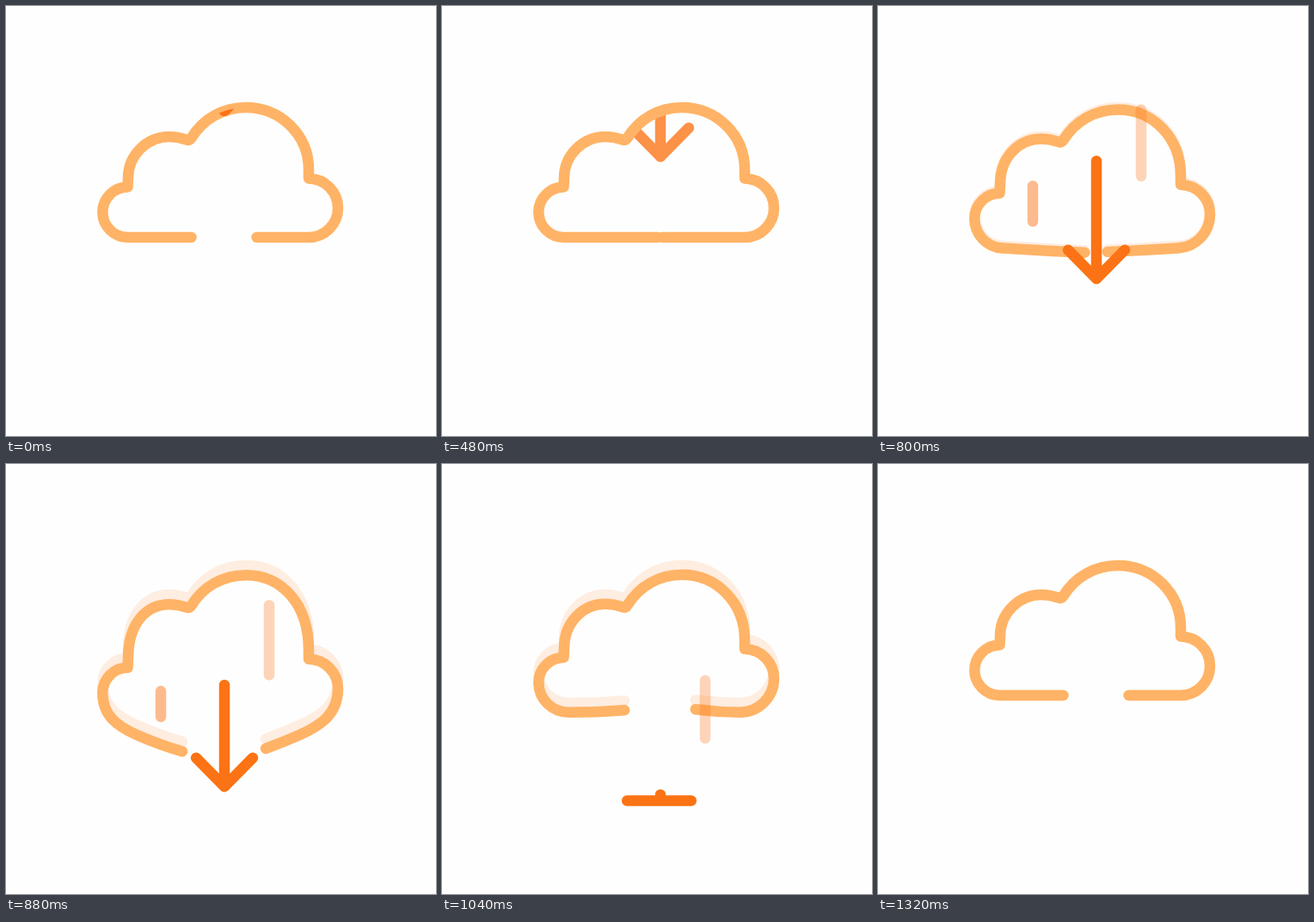
These frames come from a looping animation (500x500 px, 1480 ms). An HTML page with a canvas:

```html
<!DOCTYPE html>
<html lang="en">
<head>
<meta charset="utf-8">
<title>Cloud download</title>
<style>
html, body { margin: 0; width: 100%; height: 100%; overflow: hidden; background: #fefefe; }
canvas { display: block; }
</style>
</head>
<body>
<canvas id="stage" width="500" height="500"></canvas>
<script>
const ctx = document.getElementById('stage').getContext('2d');
const LOOP = 1480, STEP = 40, LAST = 1320;
const CLOUD = '#ffb366', ARROW = '#fb7315';
const FLOOR = 391.5, WING = 33.5, SHAFT = 137;
const HIT = 750, PEAK = 900;  // the arrow pushes through the cloud's base

const ramp = (t, from, to) => Math.max(0, Math.min(1, (t - from) / (to - from)));
const smooth = (t, from, to) => {
  const u = ramp(t, from, to);
  return u * u * (3 - 2 * u);
};
const pulse = (t, from, peak, to) => smooth(t, from, peak) - smooth(t, peak, to);
const mix = (a, b, u) => a + (b - a) * u;

// Height of the falling tip, ignoring the floor
const fall = t => 122 + .036 * t + 3.25e-7 * t ** 3;

function cloudPath(t, shift) {
  const droop = 27.7 * pulse(t, HIT, PEAK, 1190);
  const push = pulse(t, HIT, PEAK, 1108);
  const dip = 68.5 * push;
  const closing = (1 - ramp(t, 0, 560)) ** 1.35;
  const gap = 38 * (closing + smooth(t, HIT, PEAK)) + 13 * push;

  const lx = 253.5 - gap, ly = 269 + dip;
  const rx = 253.5 + gap, ry = 269 + dip * .95;
  const k1 = 141.5 + .4 * droop, k2 = 352 - .4 * droop;
  const ky = 269 + droop + .3 * dip;
  const slope = Math.max(0, 1.2 * (ly - ky) / (lx - k1));
  const p1 = 239.8 + droop, p2 = 235 + droop;
  const h1 = .55 * (k1 - 112.3), h2 = .55 * (386 - k2);
  const m1 = (lx - k1) / 2, m2 = (k2 - rx) / 2;

  const path = new Path2D();
  path.moveTo(lx, ly);
  // Base and left lobe
  path.quadraticCurveTo(k1 + m1, ky + slope * m1, k1, ky);
  path.bezierCurveTo(k1 - h1, ky - slope * h1, 112.3, mix(p1, ky, .55), 112.3, p1);
  path.bezierCurveTo(112.3, p1 - 16.1, 125.4, p1 - 29.3, 141.5, p1 - 29.3);
  path.lineTo(142, 200 + droop);
  // Small and large domes
  path.bezierCurveTo(142, 173.5 + shift, 163.5, 152 + shift, 190, 152 + shift);
  path.bezierCurveTo(198, 152 + shift, 204, 153.5 + shift, 210, 155.5 + shift);
  path.quadraticCurveTo(213.5, 157 + shift, 215.5, 153.5 + shift);
  path.bezierCurveTo(229, 131.5 + shift, 252, 118 + shift, 279, 118 + shift);
  path.bezierCurveTo(319.3, 118 + shift, 352, 150 + shift, 352, 190.5 + droop);
  // Right lobe and base
  path.lineTo(352, 200.5 + droop);
  path.bezierCurveTo(371, 201 + droop, 386, 216 + droop, 386, p2);
  path.bezierCurveTo(386, mix(p2, ky, .55), k2 + h2, ky - slope * h2, k2, ky);
  path.quadraticCurveTo(k2 - m2, ky + slope * m2, rx, ry);
  return path;
}

function stroke(path, color, alpha = 1, dy = 0) {
  ctx.save();
  ctx.translate(0, dy);
  ctx.globalAlpha = alpha;
  ctx.strokeStyle = color;
  ctx.stroke(path);
  ctx.restore();
}

function drawArrow(t, cloud, alpha) {
  const shrink = ramp(t, 1120, 1280);
  if (shrink === 1) return;
  const tip = Math.min(FLOOR, fall(t));
  const wingY = Math.min(FLOOR, fall(t) - WING);
  const flat = 1 - (tip - wingY) / WING;
  const center = 254 - 1.5 * flat;
  const span = (33 + 4.3 * flat) * (1 - shrink);
  const path = new Path2D(`M${center - span} ${wingY}L${center} ${tip}L${center + span} ${wingY}`);

  // The tail follows at full length, then slides down into the floor
  const slide = 1 - (1 - ramp(t, 800, 1055)) ** 1.2;
  const tail = mix(fall(Math.min(t, 800)) - SHAFT, FLOOR, slide);
  if (slide < 1) path.addPath(new Path2D(`M254 ${tail}V${tip}`));

  // Visible inside the cloud and anywhere below it
  const opening = new Path2D(cloud);
  opening.rect(0, 200, 500, 300);
  ctx.save();
  ctx.clip(opening);
  stroke(path, ARROW, alpha);
  ctx.restore();
}

function drawStreak(t, x, top, bottom, tailEnd, alpha) {
  const head = mix(top, bottom, ramp(t, 522, 1004));
  const tail = mix(top, bottom, ramp(t, 640, tailEnd));
  if (head > tail) stroke(new Path2D(`M${x} ${tail}V${head}`), ARROW, alpha);
}

function draw(t) {
  ctx.clearRect(0, 0, 500, 500);
  ctx.lineWidth = 12.5;
  ctx.lineCap = ctx.lineJoin = 'round';
  const shift = 14.6 * pulse(t, HIT, 940, 1240);
  const cloud = cloudPath(t, shift);
  const behind = t > 320 && t < 720;
  if (shift > 0) stroke(cloud, ARROW, .12, -shift);
  if (behind) drawArrow(t, cloud, .78);
  stroke(cloud, CLOUD);
  if (!behind) drawArrow(t, cloud, 1);
  drawStreak(t, 180, 99.5, 361.5, 1022, .48);
  drawStreak(t, 306, 33, 319, 1163, .3);
}

function tick() {
  const t = performance.now() % LOOP;
  draw(Math.min(LAST, Math.floor(t / STEP) * STEP));
  requestAnimationFrame(tick);
}
tick();
</script>
</body>
</html>
```
